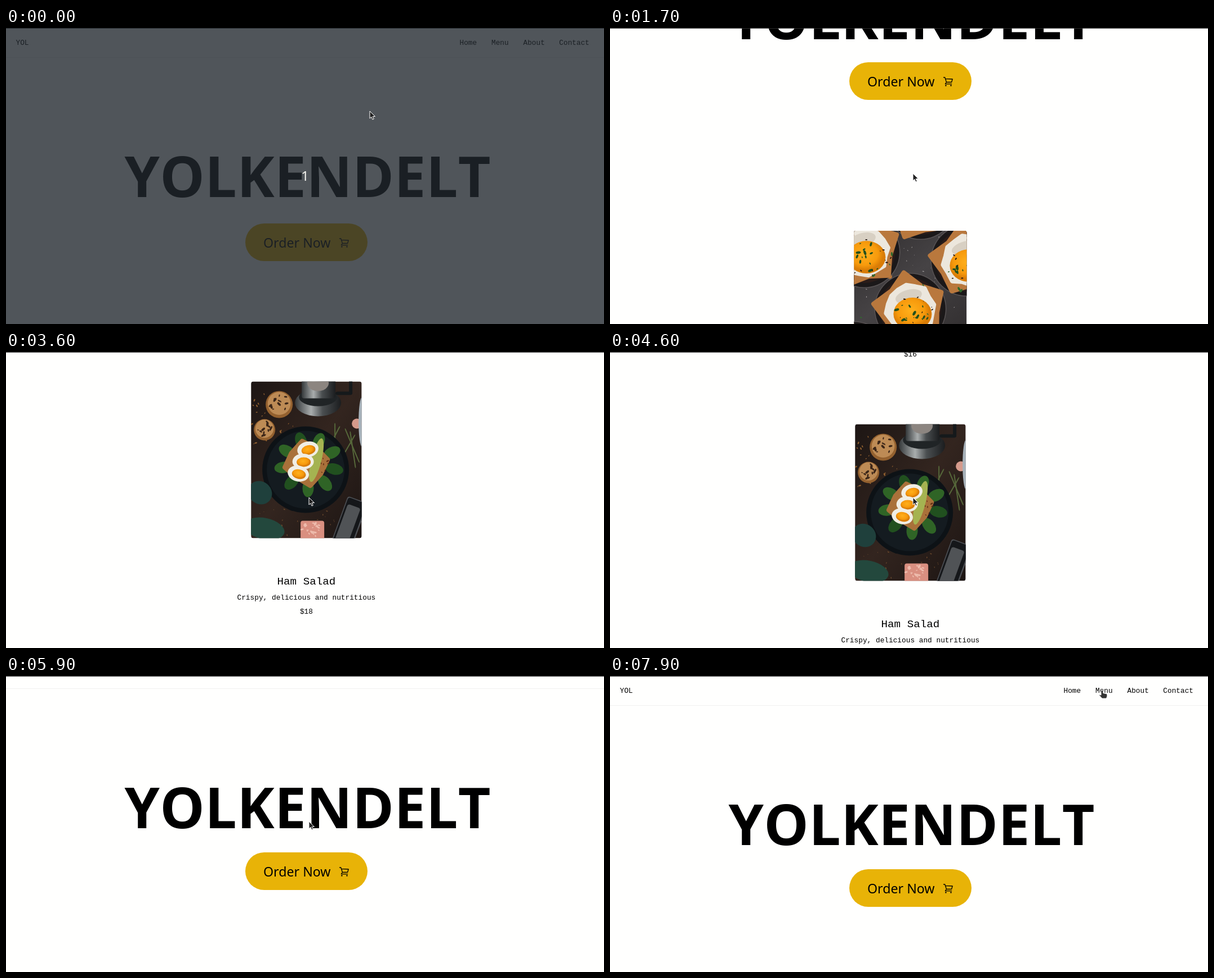
These frames come from a looping animation (1062 by 527 pixels, 8 s). An HTML page:

```html
<!DOCTYPE html>
<html lang="en">
<head>
<meta charset="utf-8">
<title>Breakfast menu</title>
<style>
  html, body { margin: 0; width: 100%; height: 100%; overflow: hidden; background: #fffffe; }
  svg { display: block; width: 100%; height: 100%; }
  .mono { font: 12.8px "Liberation Mono", monospace; }
  .mono .dish { font-size: 19.2px; }
  .mid { text-anchor: middle; }
  .sans { font-family: "Noto Sans", "Open Sans", sans-serif; }
  .title { font-size: 100px; font-weight: 700; font-kerning: none; letter-spacing: .4px; }
</style>
</head>
<body>
<svg viewBox="0 0 1062 527" preserveAspectRatio="none">
  <defs>
    <linearGradient id="tray" x2=".6" y2="1">
      <stop stop-color="#2f2c2d"/><stop offset=".45" stop-color="#464345"/><stop offset="1" stop-color="#2e2b2c"/>
    </linearGradient>
    <linearGradient id="wood" x2="1" y2="1">
      <stop stop-color="#1d1614"/><stop offset=".5" stop-color="#33251f"/><stop offset="1" stop-color="#1c1513"/>
    </linearGradient>
    <radialGradient id="yolk" cx=".45" cy=".4">
      <stop stop-color="#ffb01c"/><stop offset=".7" stop-color="#f79a0c"/><stop offset="1" stop-color="#d97c06"/>
    </radialGradient>
    <linearGradient id="steel" x2="1">
      <stop stop-color="#34383a"/><stop offset=".35" stop-color="#a9adad"/><stop offset=".6" stop-color="#4a4e50"/><stop offset="1" stop-color="#1b1d1f"/>
    </linearGradient>
  </defs>

  <rect width="1062" height="527" fill="#fffffe"/>
  <g id="page">
    <g class="mono">
      <text x="17.5" y="30">YOL</text>
      <text x="805.5" y="30">Home</text>
      <text x="862" y="30">Menu</text>
      <text x="918.5" y="30">About</text>
      <text x="982.3" y="30">Contact</text>
    </g>
    <rect y="52" width="1062" height="1" fill="#f0f0f0"/>
    <text class="sans title mid" x="535.8" y="301">YOLKENDELT</text>
    <g id="button">
      <rect x="425" y="358" width="217" height="67" rx="33.5" fill="#e8b307"/>
      <text class="sans" x="457" y="400.5" font-size="23.2">Order Now</text>
      <g transform="translate(592 384)" fill="none" stroke="#000" stroke-width="1.3" stroke-linejoin="round" stroke-linecap="round">
        <path d="M.5 1H2.8L5.5 9.5 3.4 12.7H14.6M3.6 3.3 16.2 4 14.6 9.5H5.5"/>
        <path d="M4.3 15.4h.2M13.4 15.4h.2" stroke-width="2.4"/>
      </g>
    </g>
    <g id="cards"></g>
    <rect y="1656" width="1062" height="60"/>
  </g>
  <rect width="1062" height="1" fill="#2b2b2b"/>
  <g id="veil">
    <rect width="1062" height="527" fill="rgb(34,40,46)" fill-opacity=".79"/>
    <text class="sans mid" x="531" y="272" font-size="24" fill="#f4f4ee">1</text>
  </g>
  <g id="cursor" stroke="#fff" stroke-linejoin="round" fill="#222">
    <path id="arrow" d="M0 0V13L3 10.3 5 15 7.3 14 5.3 9.5H9.5Z"/>
    <path id="hand" fill="#333" d="M-2 1Q-2-1 0-1T2 1V4.5L7.5 5.5Q9 6 9 8V10L7.5 14H0L-5 8.5Q-5 6.5-2 8Z"/>
  </g>
</svg>
<script>
const $ = id => document.getElementById(id);
const LOOP = 8000, STEP = 100, CARD_Y = 642, CARD_GAP = 534.5, PHOTO_H = 279, MID = 533.4;

let seed = 7;
const rnd = () => (seed = seed * 16807 % 2147483647) / 2147483647;
const repeat = (n, make) => Array.from({ length: n }, (_, i) => make(i)).join('');

const oval = (x, y, rx, ry, fill, turn = 0) =>
  `<ellipse cx="${x}" cy="${y}" rx="${rx}" ry="${ry}" fill="${fill}" transform="rotate(${turn} ${x} ${y})"/>`;
const disc = (x, y, r, fill) => oval(x, y, r, r, fill);
const box = (x, y, w, h, fill, turn = 0) =>
  `<rect x="${x}" y="${y}" width="${w}" height="${h}" rx="4" fill="${fill}" transform="rotate(${turn} ${x} ${y})"/>`;

const specks = (n, x, y, rx, ry, fill, size) => repeat(n, () => {
  const a = rnd() * 2 * Math.PI, q = Math.sqrt(rnd()), s = size * (.5 + rnd());
  return oval(x + Math.cos(a) * rx * q, y + Math.sin(a) * ry * q, s, s / 2, fill, rnd() * 180);
});

// Closed outline whose radius swings between r and r * (1 - dent)
function blob(x, y, r, corners, dent, fill) {
  const points = repeat(corners * 2, i => {
    const a = Math.PI * i / corners - 1.75, q = r * (1 - dent * (i % 2)) * (.94 + .1 * rnd());
    return `${x + q * Math.cos(a)},${y + q * Math.sin(a)} `;
  });
  return `<polygon points="${points}" fill="${fill}" stroke="${fill}" stroke-width="8" stroke-linejoin="round"/>`;
}

function cup(x, y) {
  const yx = x + 4, yy = y + 9;
  return disc(x, y, 64, '#575253') + disc(x, y, 62.5, '#1b1819') + disc(x, y, 55, '#2a1c19')
    + blob(x, y, 64, 5, .28, '#b9783d')
    + blob(x, y, 43, 8, .06, '#ece7dd') + oval(x - 3, y - 22, 24, 12, '#d8d0c3', -15)
    + oval(yx, yy, 34, 29, 'url(#yolk)')
    + specks(14, yx, yy, 32, 27, '#24501c', 3.2) + specks(10, yx, yy, 44, 38, '#2b1c12', 1.6);
}

function muffins() {
  let out = box(0, 0, 200, PHOTO_H, 'url(#tray)') + specks(90, 100, 140, 120, 150, '#a8a4a3', .9);
  for (let i = -1; i <= 1; i++)
    for (let j = -1; j <= 1; j++)
      if (i !== j || !i) out += cup(100 + 100 * i + 82 * j, 139 - 86 * i + 101 * j);
  return out + cup(18, 38) + cup(182, 240) + specks(14, 100, 139, 95, 135, '#2f6a2b', 2.6);
}

const cookie = (x, y, r) => disc(x, y, r, '#94612f') + disc(x, y - 2, r * .85, '#bd8b55')
  + specks(12, x, y - 2, r * .7, r * .7, '#3c2618', 3);

function salad() {
  const leaves = repeat(9, i => {
    const a = i * 40 + 12, rad = a * Math.PI / 180;
    return oval(103 + 46 * Math.cos(rad), 147 + 43 * Math.sin(rad), 16, 10, i % 3 ? '#2f6426' : '#21501f', a);
  });
  const slices = repeat(3, i => {
    const x = 101 - 8.5 * i, y = 121 + 21.5 * i, turn = 12 * i - 12;
    return oval(x, y, 19, 14, '#f1eee4', turn) + oval(x + 1, y + 1, 12.5, 8.5, 'url(#yolk)', turn);
  });
  const stems = repeat(5, i => box(148 + 9 * i, 74 + 5 * i, 2, 66, '#56683a', 30 * Math.sin(i * 2)));
  const holes = repeat(6, i => box(177 + 0 * i, 222, 2, 0, 'none'));
  return box(0, 0, 196.5, PHOTO_H, 'url(#wood)')
    + specks(36, 35, 75, 45, 55, '#91602f', 1.8) + specks(25, 80, 250, 80, 30, '#6d4a2c', 1.3)
    + oval(119, 38, 41, 24, 'url(#steel)') + oval(119, 28, 34, 16, '#202426')
    + box(90, -10, 60, 40, 'url(#steel)') + oval(119, 3, 19, 14, '#8c8580')
    + box(150, 18, 30, 6, '#15191b') + box(174, -5, 6, 28, '#15191b')
    + cookie(50, 41, 24) + cookie(24, 86, 19)
    + stems + disc(188, 75, 9, '#d59a8b') + oval(197, 72, 6, 44, '#a7b2ba')
    + disc(97, 157, 77, '#0d1216') + disc(97, 157, 69, '#141b20')
    + leaves + blob(98, 146, 40, 4, .2, '#a9713a') + specks(16, 122, 147, 16, 16, '#673018', 2.2)
    + oval(116, 140, 9, 40, '#a5b351', 14) + slices
    + oval(16, 198, 22, 20, '#1f403c', 40) + oval(24, 262, 36, 19, '#23483d', 12)
    + box(88, 248, 42, 40, '#d98f80') + specks(20, 109, 264, 19, 14, '#eebcad', 2.5)
    + box(172, 204, 38, 90, '#4c4f54', 20) + box(173, 206, 34, 90, '#15171a', 20)
    + box(172, 218, 24, 80, '#505356', 20) + holes;
}

const card = (i, width, art, name, price) => `
  <g transform="translate(0 ${CARD_Y + i * CARD_GAP})">
    <clipPath id="clip${i}"><rect width="${width}" height="${PHOTO_H}" rx="3.5"/></clipPath>
    <g transform="translate(${MID - width / 2} 0)" clip-path="url(#clip${i})">${art}</g>
    <g class="mono mid">
      <text class="dish" x="${MID}" y="361">${name}</text>
      <text x="${MID}" y="388">Crispy, delicious and nutritious</text>
      <text x="${MID}" y="413.5">${price}</text>
    </g>
  </g>`;

$('cards').innerHTML = card(0, 200, muffins(), 'Ham Muffins', '$16')
  + card(1, 196.5, salad(), 'Ham Salad', '$18');

// Wheel turns: start, end, page offset reached
const wheel = [
  [330, 1800, 301], [1800, 2100, 430], [2200, 2600, 660], [2800, 3100, 1066], [3400, 3800, 1181],
  [4400, 5000, 781.5], [5100, 5900, 29.5], [6000, 6200, 0],
];

function glide(from, legs, t) {
  for (const [start, end, to] of legs) {
    const u = Math.min(1, Math.max(0, (t - start) / (end - start)));
    from += (to - from) * u;
  }
  return from;
}

// Slow near the top, fast near the rest position
function lift(t) {
  const p = (t + 350) % 1000 / 500;
  return 16.5 * (1 - Math.min(p, 2 - p) ** 2.6);
}

const move = (id, x, y) => $(id).setAttribute('transform', `translate(${x} ${y})`);
const show = (id, on) => $(id).setAttribute('visibility', on ? 'visible' : 'hidden');

function draw(t) {
  const x = glide(646, [[1200, 1700, 538], [6400, 7500, 874]], t);
  const y = glide(148, [[1200, 1700, 259], [6400, 7500, 26]], t);
  const onLink = x > 860 && y < 36;
  move('page', 0, -Math.round(glide(0, wheel, t)));
  move('button', 0, -Math.round(lift(t)));
  move('cursor', x, y);
  show('arrow', !onLink);
  show('hand', onLink);
  show('veil', t < STEP);
}

const start = performance.now();
function tick() {
  const t = (performance.now() - start) % LOOP;
  draw(Math.floor(t / STEP) * STEP);
  requestAnimationFrame(tick);
}
draw(0);
requestAnimationFrame(tick);
</script>
</body>
</html>
```
